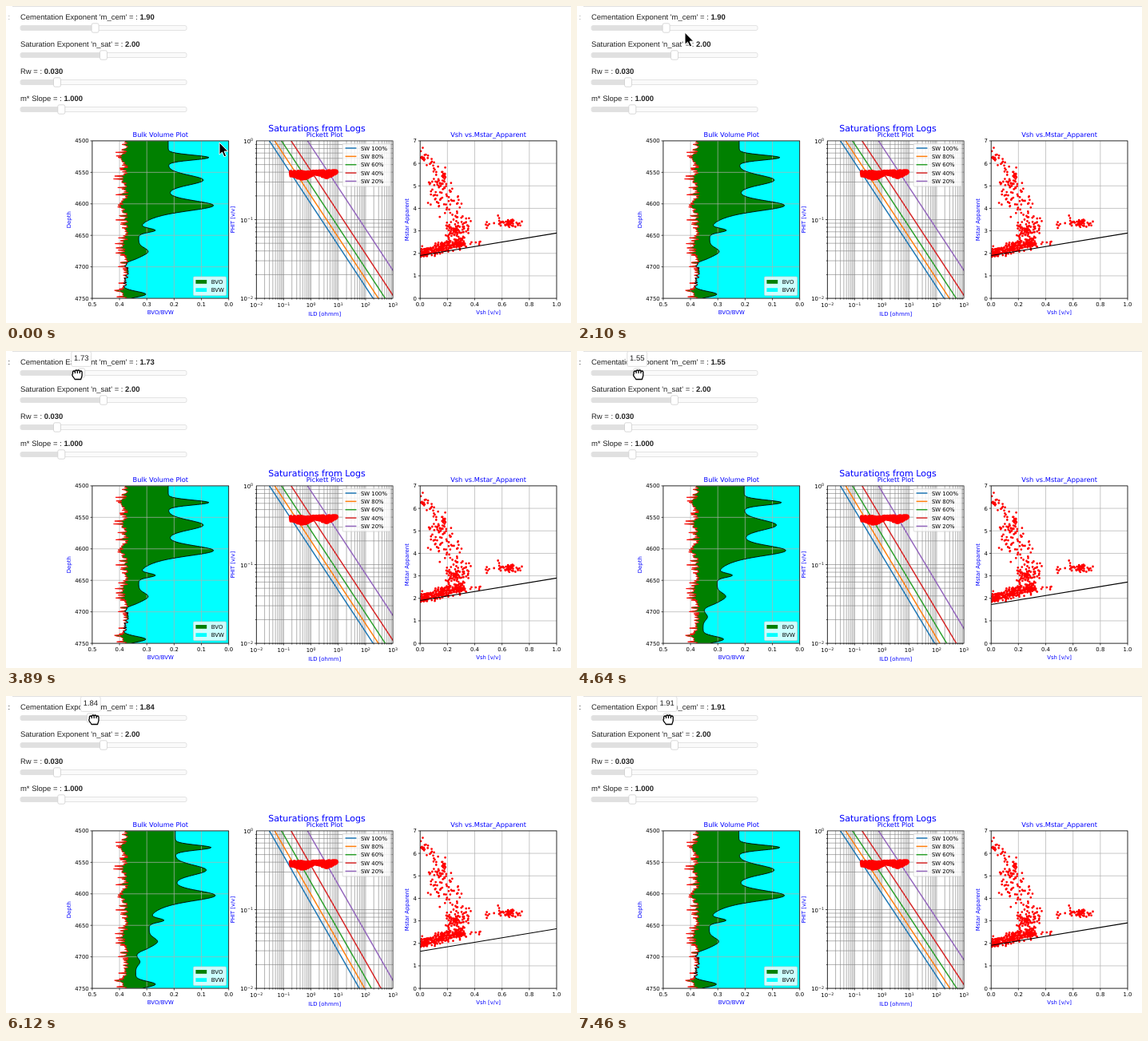
Write an HTML page that moves like this. It is 707 by 397 pixels and loops after 8 s.

```html
<!DOCTYPE html>
<html lang="en">
<head>
<meta charset="utf-8">
<title>Saturations from Logs</title>
<style>
  html, body { margin: 0; width: 100%; height: 100%; overflow: hidden; background: #fff; }
  svg { display: block; width: 707px; height: 397px; }
  text { font: 6.9px "DejaVu Sans", sans-serif; text-rendering: geometricPrecision; white-space: pre; }
  .ui { font: 9.46px "Liberation Sans", Arial, sans-serif; fill: #222; }
  .ui tspan { font-weight: bold; }
  .title { font-size: 8.28px; fill: #00f; }
  .main { font-size: 11.05px; fill: #00f; }
  .axis { fill: #00f; }
  .mid { text-anchor: middle; }
  .end { text-anchor: end; }
  .sup { font-size: 4.8px; }
  .grid { stroke: #b0b0b0; stroke-width: .7; fill: none; }
  .dense { stroke: #808080; stroke-width: .6; }
  .spine { stroke: #000; stroke-width: .7; fill: none; }
  .dots { stroke: #f00; stroke-linecap: round; fill: none; }
  .box { fill: #fff; fill-opacity: .8; stroke: #ccc; stroke-width: .7; }
  .hand { fill: #fff; stroke: #000; stroke-width: 1.3; stroke-linejoin: round; stroke-linecap: round; }
</style>
</head>
<body>
<svg id="stage" viewBox="0 0 707 397"></svg>
<script>
const LOOP = 8000, TICK = 149.3;
const TOP = 168.9, BOTTOM = 366.1, WIDTH = 170.8, HEIGHT = BOTTOM - TOP;
const stage = document.getElementById('stage');

function add(tag, attrs, parent = stage, text) {
  const el = document.createElementNS('http://www.w3.org/2000/svg', tag);
  for (const k in attrs) el.setAttribute(k, attrs[k]);
  if (text !== undefined) el.textContent = text;
  parent.appendChild(el);
  return el;
}
const label = (x, y, s, cls) => add('text', { x, y, class: cls }, stage, s);
const upright = (x, y, s) =>
  add('text', { class: 'axis mid', transform: `translate(${x} ${y}) rotate(-90)` }, stage, s);
const path = (d, attrs, parent) => add('path', { d, ...attrs }, parent);
const range = (n, f) => Array.from({ length: n }, (_, i) => f(i));
const clamp = p => Math.min(1, Math.max(0, p));
const smooth = p => p * p * (3 - 2 * p);
const hump = (y, mid, width) => Math.exp(-(((y - mid) / width) ** 2) / 2);
const fall = (y, mid, width) => 1 / (1 + Math.exp((mid - y) / width));

let seed = 11;
function rnd() {
  seed = (seed + 0x6D2B79F5) | 0;
  let v = Math.imul(seed ^ (seed >>> 15), 1 | seed);
  v = (v + Math.imul(v ^ (v >>> 7), 61 | v)) ^ v;
  return ((v ^ (v >>> 14)) >>> 0) / 4294967296;
}
const bell = () => rnd() + rnd() - 1;
const dot = (x, y) => `M${x.toFixed(1)} ${y.toFixed(1)}h0`;

// ---- sliders ----
path('M8 .5H707', { stroke: '#e0e0e0' });
const colon = label(2.5, 17, ':', 'ui');

function slider(y, name, value, x) {
  const text = label(18, y - 10.5, name + ' = : ', 'ui');
  const num = add('tspan', {}, text, value);
  add('rect', { x: 18, y: y - 3, width: 208, height: 6, rx: 2, fill: '#fafafa', stroke: '#d9d9d9', 'stroke-width': .7 });
  const bar = add('rect', { x: 18.3, y: y - 2.7, width: x - 18, height: 5.4, rx: 1.5, fill: '#e0e0e0' });
  const knob = add('rect', { x: x - 4.5, y: y - 5.7, width: 9, height: 11.4, rx: 2, fill: '#fff', stroke: '#cfcfcf', 'stroke-width': .8 });
  return { num, bar, knob };
}
const cem = slider(27.5, "Cementation Exponent 'm_cem'", '1.90', 111.6);
slider(61.5, "Saturation Exponent 'n_sat'", '2.00', 122);
slider(95.5, 'Rw', '0.030', 64);
slider(129.5, 'm* Slope', '1.000', 69.3);

// ---- shared plot parts ----
label(389, 157, 'Saturations from Logs', 'main mid');

function frame(x, title, xName, yName, yNameX) {
  add('rect', { x, y: TOP, width: WIDTH, height: HEIGHT, class: 'spine' });
  label(x + WIDTH / 2, 164.4, title, 'title mid');
  label(x + WIDTH / 2, xName.startsWith('ILD') ? 387.8 : 386.3, xName, 'axis mid');
  upright(yNameX, 267.7, yName);
}
function clip(id, x) {
  add('rect', { x, y: TOP, width: WIDTH, height: HEIGHT }, add('clipPath', { id }));
  return add('g', { 'clip-path': `url(#${id})` });
}
function linearAxes(x, xs, ys) {
  let grid = '', ticks = '';
  xs.forEach((s, i) => {
    const px = x + WIDTH * i / (xs.length - 1);
    grid += `M${px} ${TOP}V${BOTTOM}`;
    ticks += `M${px} ${BOTTOM}v2.4`;
    label(px, 376.4, s, 'mid');
  });
  ys.forEach((s, i) => {
    const py = TOP + HEIGHT * i / (ys.length - 1);
    grid += `M${x} ${py}h${WIDTH}`;
    ticks += `M${x} ${py}h-2.4`;
    label(x - 4.2, py + 2.5, s, 'end');
  });
  path(grid, { class: 'grid' });
  path(ticks, { class: 'spine' });
}

// ---- bulk volume plot ----
const BX = 107.9, ZERO = BX + WIDTH, UNIT = WIDTH / .5;
// Oil-bearing beds: depth, size, thickness
const beds = [[189.8, 51, 3.1], [218, 44, 6], [250, 58, 5.8], [281, 20, 2.5],
  [307.5, 12, 4.5], [333, 6, 4], [361, 28, 3.5]];
const waterX = y => beds.reduce((x, [mid, size, w]) => x + size * hump(y, mid, w),
  203 - 37 * fall(y, 265, 4.5) - 19 * fall(y, 319, 2));
const poroX = y => 153.5 - 5 * rnd() - 12 * rnd() ** 4 - 7 * (hump(y, 190, 4) + hump(y, 249, 5) + hump(y, 358, 4))
  - 4 * (hump(y, 217, 5) + hump(y, 303, 6));
const rows = range(220, i => {
  const y = TOP + i * .9;
  return { y, poro: poroX(y), bulk: (ZERO - waterX(y)) / UNIT };
});
const trace = pts => pts.map(([x, y]) => x.toFixed(1) + ' ' + y.toFixed(1)).join('L');
const poroLine = trace(rows.map(r => [r.poro, r.y]));
const fills = clip('bulk', BX);
path(`M${poroLine}V${BOTTOM}H${ZERO}V${TOP}Z`, { fill: '#008000' }, fills);
const water = path('', { fill: '#0ff' }, fills);
linearAxes(BX, ['0.5', '0.4', '0.3', '0.2', '0.1', '0.0'], range(6, i => 4500 + 50 * i));
const curves = add('g', { 'clip-path': 'url(#bulk)', fill: 'none', 'stroke-width': .9 });
path('M' + poroLine, { stroke: '#f00' }, curves);
const edge = path('', { stroke: '#000' }, curves);
frame(BX, 'Bulk Volume Plot', 'BVO/BVW', 'Depth', 81.3);
add('rect', { x: 234.5, y: 339, width: 41, height: 23.6, rx: 1.4, class: 'box' });
[['BVO', '#008000'], ['BVW', '#0ff']].forEach(([s, fill], i) => {
  add('rect', { x: 237.4, y: 343 + i * 10.2, width: 13.8, height: 4.8, fill });
  label(256.8, 348 + i * 10.2, s);
});

// ---- Pickett plot ----
const PX = 313.3, DX = WIDTH / 5, DY = HEIGHT / 2;
function power(x, y, n, cls) {
  const t = label(x, y, '10', cls);
  add('tspan', { class: 'sup', dy: -2.6 }, t, String(n).replace('-', '\u2212'));
}
let logGrid = '', logTicks = '';
for (let d = 0; d < 5; d++) for (let k = 1; k < 10; k++) {
  const x = PX + DX * (d + Math.log10(k)), len = k === 1 ? 2.4 : 1.4;
  logGrid += `M${x} ${TOP}V${BOTTOM}`;
  logTicks += `M${x} ${BOTTOM}v${len}`;
  if (d < 2) {
    const y = BOTTOM - DY * (d + Math.log10(k));
    logGrid += `M${PX} ${y}h${WIDTH}`;
    logTicks += `M${PX} ${y}h-${len}`;
  }
}
path(logGrid, { class: 'grid dense' });
path(logTicks, { class: 'spine' });
for (let n = -2; n <= 3; n++) power(PX + DX * (n + 2), 377.4, n, 'mid');
for (let n = 0; n <= 2; n++) power(PX - 4.2, TOP + DY * n + 3, -n, 'end');

const pickett = clip('pickett', PX);
const sats = [[100, '#1f77b4'], [80, '#ff7f0e'], [60, '#2ca02c'], [40, '#d62728'], [20, '#9467bd']];
const satLines = sats.map(([, stroke]) => path('', { stroke, 'stroke-width': 1.5 }, pickett));
let cloud = '';
for (let i = 0; i < 380; i++) {
  const u = rnd(), x = 356 + 58 * u, top = 207.3 - u;
  const low = 215.5 - 4 * u + 2.5 * Math.cos((x - 372) / 4.7);
  cloud += dot(x, top + rnd() * (low - top));
}
path(cloud, { class: 'dots', 'stroke-width': 4.4 }, pickett);
frame(PX, 'Pickett Plot', 'ILD [ohmm]', 'PHIT [v/v]', 286.2);
add('rect', { x: 421.2, y: 172.2, width: 60, height: 53.8, rx: 1.4, class: 'box' });
sats.forEach(([n, stroke], i) => {
  const y = 178 + i * 10.35;
  path(`M424.6 ${y}h13.8`, { stroke, 'stroke-width': 1.5 });
  label(443.9, y + 2.5, `SW ${n}%`);
});

// ---- shale volume plot ----
const VX = 518.2;
const vshX = v => VX + v * WIDTH, mstarY = v => BOTTOM - v * HEIGHT / 7;
linearAxes(VX, ['0.0', '0.2', '0.4', '0.6', '0.8', '1.0'], range(8, i => 7 - i));
const shale = clip('shale', VX);
let spots = '';
// Count, centre and spread in plot units, tilt
function cluster(n, v, m, dv, dm, tilt = 0) {
  while (n--) {
    const d = bell() * dv;
    spots += dot(vshX(Math.max(.005, v + d)), mstarY(m + d * tilt + bell() * dm));
  }
}
for (let i = 0; i < 260; i++) {
  const v = .32 * rnd() ** 1.2;
  spots += dot(vshX(v + .005), mstarY(1.85 + 1.6 * v + bell() * .2 + rnd() * .3));
}
cluster(25, .3, 2.45, .16, .2);
cluster(75, .26, 3, .12, .4, 1);
cluster(30, .27, 3.6, .2, .8);
cluster(65, .16, 5.1, .12, .9);
cluster(22, .17, 4.3, .13, .5);
cluster(22, .05, 6.2, .07, .4, -4);
cluster(50, .65, 3.35, .1, .2);
cluster(12, .48, 3.4, .16, .3);
path(spots, { class: 'dots', 'stroke-width': 2.8 }, shale);
const trend = path('', { stroke: '#000', 'stroke-width': 1.1 }, shale);
frame(VX, 'Vsh vs.Mstar_Apparent', 'Vsh [v/v]', 'Mstar Apparent', 504);

// ---- tooltip and pointers ----
const tip = add('g', {});
add('rect', { x: -12.4, y: .6, width: 24.8, height: 18.8, rx: 2, fill: '#fff', stroke: '#d9d9d9', 'stroke-width': .8 }, tip);
const tipText = add('text', { x: 0, y: 12.1, class: 'ui mid' }, tip);
const arrow = path('M0 0V15.2L3.5 12L6 17.8L8.6 16.7L6.1 11H10.8Z',
  { fill: '#000', stroke: '#fff', 'stroke-width': 1, 'stroke-linejoin': 'round' });

// Hand with four fingers reaching up by `reach`
function hand(reach) {
  const fingers = range(4, i => {
    const tipY = -reach - (i % 3 ? 1 : 0);
    return `V${tipY}q1.45 -2.2 2.9 0V-2`;
  }).join('');
  return path(`M-5.8 -1${fingers}L5.8 1C5.8 3 4.6 4 4.4 6H-3.2C-3.4 4.3 -6.4 3 -6.4 .6C-6.4 -.4 -6 -.8 -5.8 -1Z`, { class: 'hand' });
}
const fist = hand(3.4), open = hand(5.6);

// ---- motion ----
function exponent(t) {
  const down = smooth(clamp((t - 3300) / 1200)), up = clamp((t - 4790) / 1740) ** .75;
  return 1.9 - .35 * down + .36 * up;
}
// The plots redraw on every fourth tick and trail the slider
const plotted = tick => exponent((Math.floor((tick - 2) / 4) * 4 + 2) * TICK - 580);
const knobX = m => 18 + 104 * (m - 1);

function drawPlots(m) {
  const scale = .375 ** ((1.9 - m) / 2);
  const line = trace(rows.map(r => [Math.max(r.poro, ZERO - UNIT * r.bulk * scale), r.y]));
  edge.setAttribute('d', 'M' + line);
  water.setAttribute('d', `M${line}V${BOTTOM}H${ZERO}V${TOP}Z`);
  sats.forEach(([n], i) => {
    const x = PX + DX * (2 + Math.log10(.03 / (n / 100) ** 2));
    satLines[i].setAttribute('d', `M${x} ${TOP}L${x + 2 * m * DX} ${BOTTOM}`);
  });
  trend.setAttribute('d', `M${VX} ${mstarY(m)}L${VX + WIDTH} ${mstarY(m + 1)}`);
}

const show = (el, on) => el.setAttribute('visibility', on ? 'visible' : 'hidden');
const move = (el, x, y) => el.setAttribute('transform', `translate(${x} ${y})`);
let drawn;

function render(time) {
  const tick = Math.floor((time + 6) / TICK), t = tick * TICK;
  const m = exponent(t), x = knobX(m);
  cem.num.textContent = tipText.textContent = m.toFixed(2);
  cem.bar.setAttribute('width', x - 18);
  cem.knob.setAttribute('x', x - 4.5);
  colon.style.fill = tick < 21 ? '#999' : '#222';

  show(tip, tick >= 15);
  move(tip, x, 0);

  const away = smooth(clamp(t / 450)), back = smooth(clamp((t - 1180) / 1060));
  show(arrow, tick < 16);
  move(arrow, 267 + 25 * away - 166 * back, 171 - 62 * away - 82 * back ** 1.4);

  const handX = knobX(exponent(t + TICK)) + 1.8;
  show(open, tick >= 16 && tick < 21);
  show(fist, tick >= 21);
  move(open, handX, 29.5);
  move(fist, handX, 29.5);

  const pm = plotted(tick);
  if (pm !== drawn) drawPlots(drawn = pm);
}

const start = performance.now();
function loop() {
  render((performance.now() - start) % LOOP);
  requestAnimationFrame(loop);
}
loop();
</script>
</body>
</html>
```
